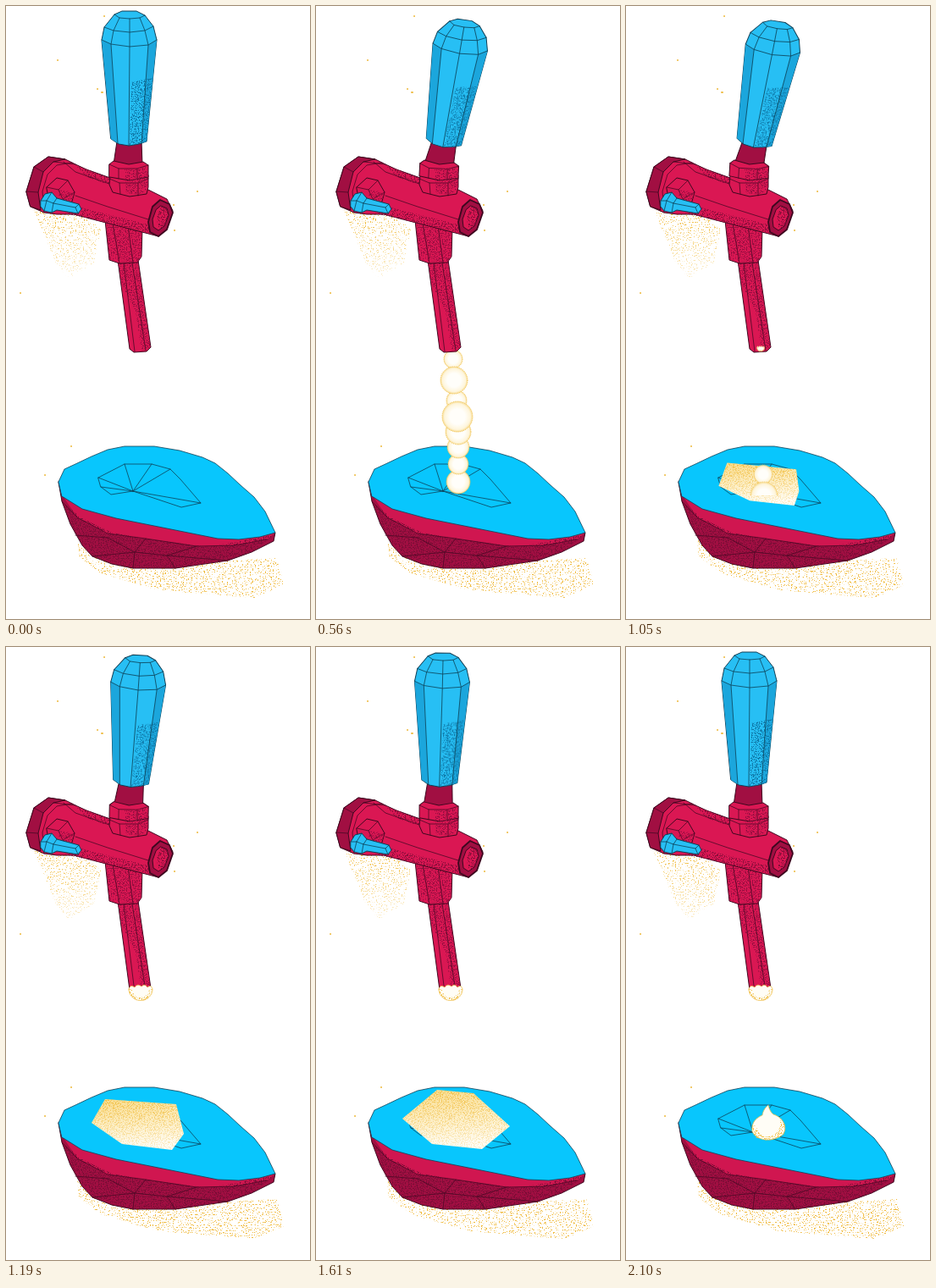
These frames come from a looping animation (359x724 px, 2170 ms). An HTML page without scripts:

```html
<!DOCTYPE html>
<html lang="en">
<head>
<meta charset="utf-8">
<title>Avocado tap</title>
<style>
@property --pull { syntax: "<number>"; inherits: true; initial-value: 0; }

html, body { margin: 0; width: 100%; height: 100%; overflow: hidden; background: #fff; }
svg { display: block; width: 359px; height: 724px; }
path { stroke-linejoin: round; stroke-linecap: round; }
.red { fill: #d9185a; fill: #da1753; stroke: #3d081f; }
.deep { fill: #a10f42; stroke: #3d081f; }
.blue { fill: #27bff4; stroke: #123f55; }
.line { fill: none; stroke: #4a0a25; stroke-width: .8; }
.edge { fill: none; stroke: #0d4258; stroke-width: .8; }
.dots { fill: none; stroke: #efbe48; stroke-width: 2; }
.grain { filter: url(#grain); }
.sand { filter: url(#sand); }
.rim { stroke: #efbd45; stroke-dasharray: 1 1.2; }

/* Time moves in 70 ms steps, 31 to a loop. */
.lever, .stream, .pool, .bead, .blob { animation: 2170ms infinite; }

/* The handle springs open, then springs shut past upright. */
.lever { animation-name: pull; }
@keyframes pull {
  0% { --pull: 0; animation-timing-function: steps(4); }
  12.9% { --pull: 1; animation-timing-function: steps(4); }
  25.81% { --pull: .6; animation-timing-function: steps(4); }
  38.71%, 48.39% { --pull: .68; animation-timing-function: steps(2); }
  54.84% { --pull: .25; animation-timing-function: steps(2); }
  61.29% { --pull: -.3; animation-timing-function: steps(4); }
  74.19% { --pull: .08; animation-timing-function: steps(4); }
  87.1%, 100% { --pull: 0; }
}
.grip {
  transform-origin: 145px 195px;
  transform: rotate(calc(var(--pull) * 13deg)) skewX(calc(var(--pull) * -3deg)) scaleY(calc(1 - var(--pull) * .07));
}
.ring {
  transform-origin: 145px 200px;
  transform: rotate(calc(var(--pull) * 5deg));
}

/* The pour slides out of the spout and falls into the hollow. */
.stream { animation-name: pour; }
@keyframes pour {
  0%, 9.68% { transform: translateY(-175px); animation-timing-function: steps(1); }
  12.9% { transform: translateY(-160px); animation-timing-function: steps(4); }
  25.81% { transform: none; animation-timing-function: steps(4); }
  38.71% { transform: translateY(5px); animation-timing-function: steps(4); }
  51.61%, 100% { transform: translateY(180px); }
}

.pool { animation-name: pool; }
@keyframes pool {
  0%, 25.81% { d: path("M168 576 168 576 168 576 168 576 168 576 168 576Z"); animation-timing-function: steps(4); }
  38.71% { d: path("M123 548 201 558 196 570 203 584 160 580 122 574Z"); animation-timing-function: steps(5); }
  54.84% { d: path("M117 534 201 540 210 575 196 594 137 587 101 562Z"); animation-timing-function: steps(6); }
  74.19% { d: path("M143 523 186 527 229 566 196 593 137 587 102 557Z"); animation-timing-function: steps(7); }
  96.77%, 100% { d: path("M168 576 168 576 168 576 168 576 168 576 168 576Z"); }
}

.bead { transform-origin: 159px 403px; animation-name: bead; }
@keyframes bead {
  0%, 45.16% { transform: scale(0); animation-timing-function: steps(3); }
  54.84%, 100% { transform: none; }
}
.blob { transform-origin: 168px 576px; animation-name: blob; }
@keyframes blob {
  0%, 80.65% { transform: scale(0); animation-timing-function: steps(5); }
  96.77%, 100% { transform: none; }
}
</style>
</head>
<body>
<svg viewBox="0 0 359 724">
  <defs>
    <filter id="grain">
      <feTurbulence type="fractalNoise" baseFrequency=".73" numOctaves="2" seed="4"/>
      <feColorMatrix values="0 0 0 0 0 0 0 0 0 0 0 0 0 0 0 0 0 0 12 -6.2" result="n"/>
      <feComposite in="SourceGraphic" in2="n" operator="in"/>
    </filter>
    <filter id="sand">
      <feTurbulence type="fractalNoise" baseFrequency=".67" numOctaves="2" seed="9">
        <animate attributeName="seed" values="9;12;15;21" dur="280ms" calcMode="discrete" repeatCount="indefinite"/>
      </feTurbulence>
      <feColorMatrix values="0 0 0 0 0 0 0 0 0 0 0 0 0 0 0 0 0 0 12 -7.2" result="n"/>
      <feComposite in="SourceGraphic" in2="n" operator="in"/>
    </filter>
    <radialGradient id="foam">
      <stop offset=".5" stop-color="#fffefa"/>
      <stop offset=".85" stop-color="#fef5db"/>
      <stop offset="1" stop-color="#f8dc92"/>
    </radialGradient>
    <linearGradient id="cream" x2=".15" y2="1">
      <stop offset="0" stop-color="#f9dc8c"/>
      <stop offset=".6" stop-color="#fdf0cb"/>
      <stop offset="1" stop-color="#fffcf4"/>
    </linearGradient>
    <linearGradient id="fade" x2="0" y2="1">
      <stop offset="0" stop-color="#efb62e"/>
      <stop offset="1" stop-color="#f3c451" stop-opacity=".3"/>
    </linearGradient>
    <clipPath id="gap"><path d="M130 407H210V578H130Z"/></clipPath>
  </defs>

  <!-- cast shadows and specks -->
  <path class="sand" fill="url(#fade)" d="M32 240 96 250 112 264 104 303 74 322 58 302 42 262Z"/>
  <path class="sand" fill="#f0ba3c" d="M84 630 150 664 262 655 320 652 328 684 293 699 180 690 112 670 86 650Z"/>
  <path class="dots" d="M116 12h.1M61 64h.1M108 98h.1M113 102h1M226 219h.1M198 235h.1M199 265h.1M17 339h.1M46 554h.1M77 520h.1"/>

  <!-- avocado -->
  <path class="deep" d="M62 562 66 585 76 612 90 637 102 650 125 659 150 664 200 664 262 655 290 645 316 632 318 622 240 610 100 580Z"/>
  <path fill="#d01650" d="M64 574 90 590 170 610 275 628 318 622 308 630 270 637 225 638 165 629 120 623 84 604Z"/>
  <path class="grain" fill="#7a0c36" d="M66 585 90 605 125 622 170 630 240 639 318 624 290 645 262 655 200 664 150 664 102 650 82 624Z"/>
  <path class="line" d="M66 585 84 604 120 623 165 629 225 638 270 637 308 630M82 625 120 628 152 645 190 649 262 655M102 650 152 645 150 664M165 629 152 645M225 638 190 649 200 664"/>
  <path class="blue" style="fill:#08c6fd;stroke-width:.8" d="M62 562 69 547 82 541 101 532 120 524 140 520 175 520 205 525 232 533 247 540 262 552 277 566 293 580 306 597 318 622 300 627 275 630 250 629 215 622 170 613 130 605 90 594 66 579Z"/>
  <path class="edge" fill="#10bdf2" d="M109 557 140 541 172 541 194 547 206 559 230 587 207 592 150 573 124 577 112 568ZM150 573 109 557M150 573 112 568M150 573 140 541M150 573 172 541M150 573 194 547M150 573 230 587"/>

  <!-- cream in the hollow -->
  <path class="pool" fill="url(#cream)"/>
  <path class="pool grain" fill="url(#fade)" opacity=".75"/>
  <g class="blob">
    <path class="rim" fill="#fffdf6" d="M149 572C148 561 154 556 161 553Q162 546 168 541 170 549 174 552C187 556 191 569 185 576 172 586 154 583 149 572Z"/>
    <path class="grain" fill="#f0be44" d="M149 565 154 566Q156 579 169 578 183 576 182 559L188 565 186 577 168 583 152 579Z"/>
  </g>

  <!-- pour -->
  <g clip-path="url(#gap)">
    <g class="stream rim" fill="url(#foam)">
      <circle cx="168" cy="562" r="14"/>
      <circle cx="168" cy="541" r="12"/>
      <circle cx="168" cy="521" r="13"/>
      <circle cx="168" cy="503" r="15"/>
      <circle cx="166" cy="466" r="12"/>
      <circle cx="167" cy="485" r="18"/>
      <circle cx="162" cy="417" r="11"/>
      <circle cx="163" cy="442" r="16"/>
    </g>
  </g>

  <!-- spout -->
  <path class="red" d="M132 300 146 405 151 409 166 408 171 403 156 300Z"/>
  <path class="grain" fill="#96103f" d="M132 303 156 303 171 403 160 408 153 360 137 330Z"/>
  <path class="line" d="M139 303 152 408M149 303 165 407"/>
  <path class="red" d="M117 253 122 300 134 304 155 303 160 296 161 262Z"/>
  <path class="grain" fill="#9b0f41" d="M119 258 160 266 160 296 155 303 122 300Z"/>
  <path class="line" d="M126 256 134 304M144 260 150 303"/>

  <!-- wall flange and body -->
  <path class="red" d="M24 219 33 190 50 178 70 181 82 187 95 193 123 203 168 217 190 228 197 242 190 264 180 272 118 256 80 246 60 246 45 244 29 237Z"/>
  <path class="deep" d="M24 219 33 190 50 178 70 181 56 184 44 196 38 220 41 241 29 237Z"/>
  <path class="grain" fill="#8c0c3a" d="M80 236 120 246 168 258 178 270 118 256 70 245ZM82 188 123 203 122 211 95 202Z"/>
  <path class="line" d="M33 190 44 196M24 219 38 220M56 184 82 187M78 185 60 188 49 199 43 219 45 244M68 184 82 196 122 210M82 224 120 237 168 252"/>
  <path class="red" d="M48 214 60 203 73 206 81 220 77 234 63 238 51 230Z"/>
  <path class="line" d="M48 214 62 217 73 206M62 217 67 228 81 220M67 228 63 238"/>
  <path class="grain" fill="#98103f" d="M62 217 81 220 77 234 63 238Z"/>
  <path class="deep" stroke-width="1.8" d="M182 229 193 234 197 244 190 264 180 272 170 267 168 255 173 237Z"/>
  <path class="red" d="M183 236 190 239 192 247 187 260 180 265 174 261 173 252 177 241Z"/>
  <path class="grain" fill="#860c38" d="M183 236 190 239 192 247 187 260 180 265 178 250Z"/>

  <!-- side lever -->
  <path class="blue" d="M41 230 46 222 54 220 60 227 86 234 89 240 85 245 60 241 54 244 45 242 41 237Z"/>
  <path class="edge" d="M41 230 48 230 54 220M48 230 45 242M48 230 56 233 60 227M56 233 54 244M56 233 82 238 86 234M82 238 85 245"/>

  <!-- collar and handle -->
  <path class="red" d="M123 200 122 211 126 220 146 225 166 222 168 214 168 200Z"/>
  <path class="line" d="M122 204 134 209 156 209 168 204M134 209 135 222M156 209 156 224"/>
  <g class="lever">
    <path class="grip deep" d="M131 160 127 187 145 191 161 187 160 160Z"/>
    <g class="ring">
      <path class="red" d="M122 187 127 183 145 187 162 184 168 188 168 202 146 206 122 202Z"/>
      <path class="line" d="M122 187 133 192 155 192 168 188M133 192 133 204M155 192 155 205"/>
    </g>
    <g class="grip">
      <path class="blue" d="M113 40 116 25 128 10 137 6 154 6 164 11 174 24 178 40 166 160 157 163 145 165 133 163 124 157Z"/>
      <path fill="#1ba6dc" d="M113 40 124 45 132 162 124 157ZM168 46 178 40 166 160 160 162Z"/>
      <path class="grain" fill="#0f76a6" d="M148 90 173 85 166 160 157 163 146 165Z"/>
      <path class="edge" d="M113 40 124 45 146 48 168 46 178 40M116 25 127 29 146 31 164 29 174 24M128 10 134 14 146 15 158 14 164 11M134 14 127 29 124 45 132 162M146 15V48L145 165M158 14 164 29 168 46 160 163"/>
    </g>
  </g>
  <path class="grain" fill="#970f40" d="M140 193 168 190 168 214 160 222 142 222Z"/>

  <!-- bead left on the spout -->
  <g class="bead">
    <path class="rim" fill="#fffdf6" d="M145 404Q147 398 152 402 155 397 160 401 164 397 167 402 171 398 173 404A14 13.5 0 0 1 145 404Z"/>
    <path class="grain" fill="#f0be44" d="M145 404 149 405Q151 414 159 414 168 413 169 405L173 404A14 13.5 0 0 1 145 404Z"/>
  </g>
</svg>
</body>
</html>
```
